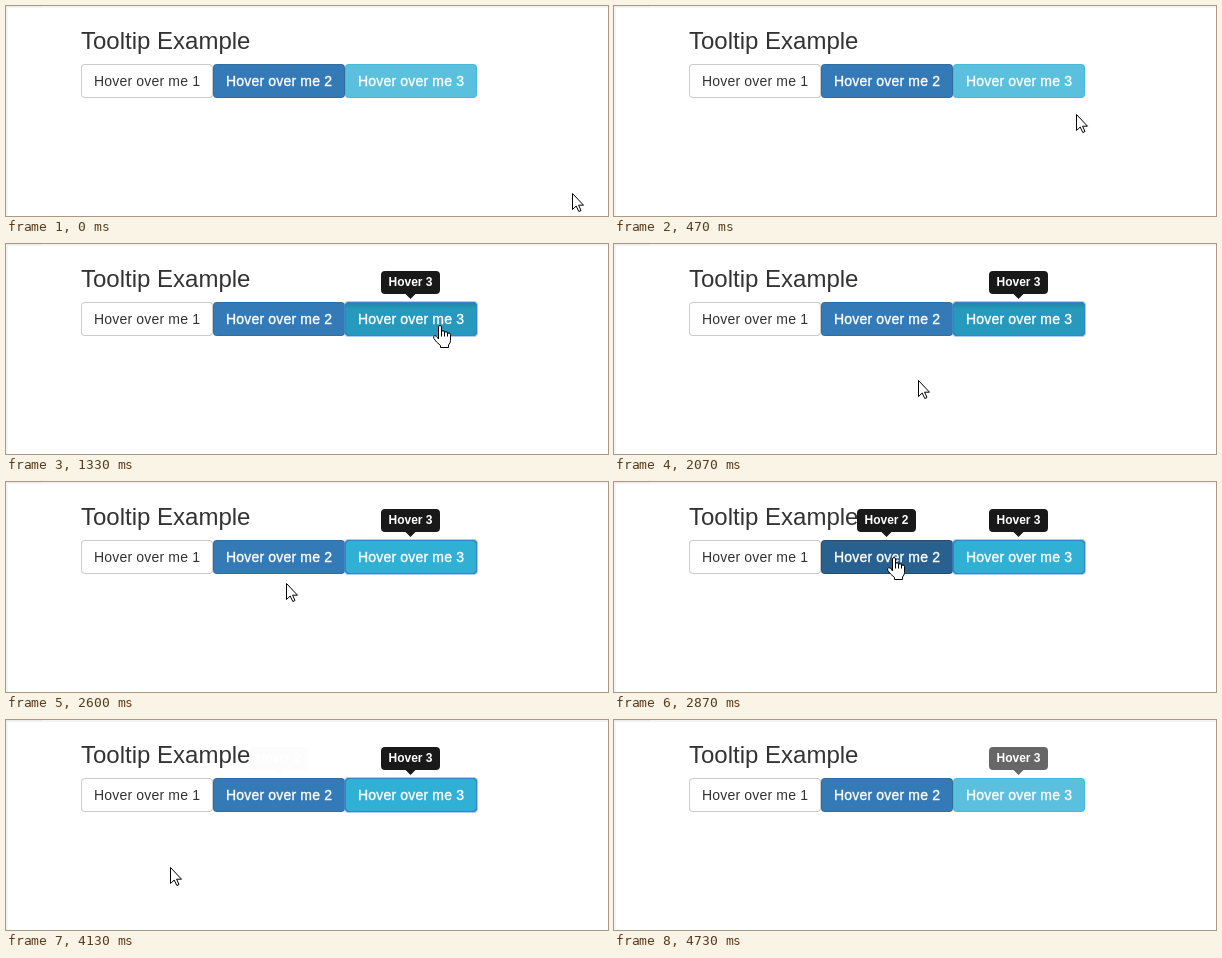
Animation of 602 by 210 pixels, one loop 4.79 s. Source, as an HTML page with a canvas:

```html
<!DOCTYPE html>
<html lang="en">
<head>
<meta charset="utf-8">
<title>Tooltip Example</title>
<style>
  html, body { margin: 0; width: 100%; height: 100%; overflow: hidden; background: #fff; }
  canvas { display: block; }
</style>
</head>
<body>
<canvas id="stage" width="602" height="210"></canvas>
<script>
const ctx = document.getElementById('stage').getContext('2d');
const FONT = '"Liberation Sans", Arial, sans-serif';
const LOOP = 4790;
const TICK = 1000 / 15;
const BTN = { y: 58, w: 132, h: 34 };

const clamp = v => Math.max(0, Math.min(1, v));
const mix = (a, b, k) => a + (b - a) * k;
const smooth = k => k * k * (3 - 2 * k);
const easeOut = k => k * (2 - k);

// The pointer rests between moves; times in ms
const home = { x: 567, y: 187 };
const moves = [
  { from: 0, until: 870, x: 434, y: 86, ease: easeOut },
  { from: 1070, until: 1130, x: 433, y: 81, ease: smooth },
  { from: 1610, until: 2210, x: 283, y: 145, ease: smooth },
  { from: 2210, until: 2880, x: 279, y: 75, ease: smooth },
  { from: 3850, until: 4400, x: 60, y: 213, ease: smooth }
];
const press = { from: 1330, until: 2400 };
const focus = { from: 1330, until: 4680 };

const buttons = [
  { label: 'Hover over me 1', text: '#333',
    normal: ['#fff', '#ccc'], hover: ['#e6e6e6', '#adadad'] },
  { label: 'Hover over me 2', text: '#fff',
    normal: ['#337ab7', '#2e6da4'], hover: ['#286090', '#204d74'] },
  { label: 'Hover over me 3', text: '#fff',
    normal: ['#5bc0de', '#46b8da'], hover: ['#31b0d5', '#269abc'],
    focus: ['#31b0d5', '#1b6d85'], active: ['#269abc', '#1b6d85'] }
];
buttons.forEach((b, i) => { b.x = 75 + i * BTN.w; });

const tips = [
  { x: 243, label: 'Hover 2', show: 2716, hide: 3985 },
  { x: 375, label: 'Hover 3', show: 716, hide: 4683 }
];

const arrow = new Path2D('M.5 .5V16.5L4.2 13L6.8 18.5L9 17.5L6.6 12.2H11.5Z');
const hand = new Path2D(
  'M5.5 14V2Q5.5 .5 7 .5Q8.5 .5 8.5 2V7Q8.5 5.7 10 5.7Q11.5 5.7 11.5 7.2V8' +
  'Q11.5 6.7 13 6.7Q14.5 6.7 14.5 8.2V9Q14.5 8 16 8Q17.5 8 17.5 9.5V15.5' +
  'Q17.5 18 15.5 20V22.5H7.5V20.5Q3 17 .8 13.5Q0 11 1.8 10.6Q3.5 10.5 5.5 14Z');
const knuckles = new Path2D('M8.5 7V11.5M11.5 8V11.5M14.5 9V11.5');

const during = (span, time) => time >= span.from && time < span.until;

function pointerAt(time) {
  let { x, y } = home;
  for (const m of moves) {
    const k = m.ease(clamp((time - m.from) / (m.until - m.from)));
    x = mix(x, m.x, k);
    y = mix(y, m.y, k);
  }
  return { x: Math.round(x), y: Math.round(y) };
}

function text(str, x, y, font, color, align = 'left') {
  ctx.font = `${font} ${FONT}`;
  ctx.fillStyle = color;
  ctx.textAlign = align;
  ctx.fillText(str, x, y);
}

function box(x, y, w, h, r) {
  ctx.beginPath();
  ctx.roundRect(x, y, w, h, r);
}

function drawButton(b, state) {
  const { y, w, h } = BTN;
  const [fill, border] = b[state];
  box(b.x, y, w, h, 4);
  ctx.fillStyle = border;
  ctx.fill();
  box(b.x + 1, y + 1, w - 2, h - 2, 3);
  ctx.fillStyle = fill;
  ctx.fill();

  if (state === 'active') {
    const shade = ctx.createLinearGradient(0, y + 1, 0, y + 7);
    shade.addColorStop(0, 'rgba(0,0,0,.12)');
    shade.addColorStop(1, 'rgba(0,0,0,0)');
    ctx.fillStyle = shade;
    ctx.fill();
  }
  if (state === 'active' || state === 'focus') {
    ctx.lineWidth = 1;
    box(b.x - .5, y - .5, w + 1, h + 1, 3);
    ctx.strokeStyle = 'rgba(90,155,235,.5)';
    ctx.stroke();
    box(b.x + .5, y + .5, w - 1, h - 1, 3);
    ctx.strokeStyle = '#3584cf';
    ctx.stroke();
  }

  ctx.letterSpacing = '0.18px';
  text(b.label, b.x + 13, 80, '14px', b.text);
  if (b.text === '#fff') {
    // Light text on colour looks slightly heavier
    ctx.lineWidth = .35;
    ctx.strokeStyle = b.text;
    ctx.strokeText(b.label, b.x + 13, 80);
  }
  ctx.letterSpacing = '0px';
}

function drawTip(tip, time) {
  const fade = clamp(Math.min(time - tip.show, tip.hide + 150 - time) / 150);
  if (!fade) return;
  const mid = tip.x + 29.5;
  box(tip.x, 27, 59, 23, 4);
  ctx.moveTo(mid - 5, 50);
  ctx.lineTo(mid + 5, 50);
  ctx.lineTo(mid, 55);
  ctx.closePath();
  ctx.fillStyle = `rgba(0,0,0,${.9 * fade})`;
  ctx.fill();
  text(tip.label, mid, 42, 'bold 12px', '#fff', 'center');
}

function drawPointer({ x, y }, over) {
  const shape = over ? hand : arrow;
  ctx.save();
  ctx.translate(x - (over ? 6 : 1), y);
  ctx.lineWidth = 1;
  ctx.lineJoin = 'round';
  ctx.fillStyle = '#fff';
  ctx.strokeStyle = '#000';
  ctx.fill(shape);
  ctx.stroke(shape);
  if (over) ctx.stroke(knuckles);
  ctx.restore();
}

function render(ms) {
  // The picture advances 15 times a second
  const time = Math.floor((ms + 4) / TICK) * TICK;
  const pointer = pointerAt(time);
  const inRow = pointer.y >= BTN.y && pointer.y < BTN.y + BTN.h;
  const over = buttons.find(b => inRow && pointer.x >= b.x && pointer.x < b.x + BTN.w);

  ctx.fillStyle = '#fff';
  ctx.fillRect(0, 0, 602, 210);
  ctx.fillStyle = '#f4f4f4';
  ctx.fillRect(0, 0, 602, 2);
  ctx.fillRect(0, 0, 2, 210);
  ctx.fillStyle = '#ebebeb';
  ctx.fillRect(0, 0, 36, 1);

  text('Tooltip Example', 75, 43, '24px', '#333');
  for (const b of buttons) {
    let state = b === over ? 'hover' : 'normal';
    if (b.focus && during(focus, time)) state = during(press, time) ? 'active' : 'focus';
    drawButton(b, state);
  }
  tips.forEach(tip => drawTip(tip, time));
  drawPointer(pointer, !!over);
}

const start = performance.now();
function loop() {
  render((performance.now() - start) % LOOP);
  requestAnimationFrame(loop);
}
loop();
</script>
</body>
</html>
```
